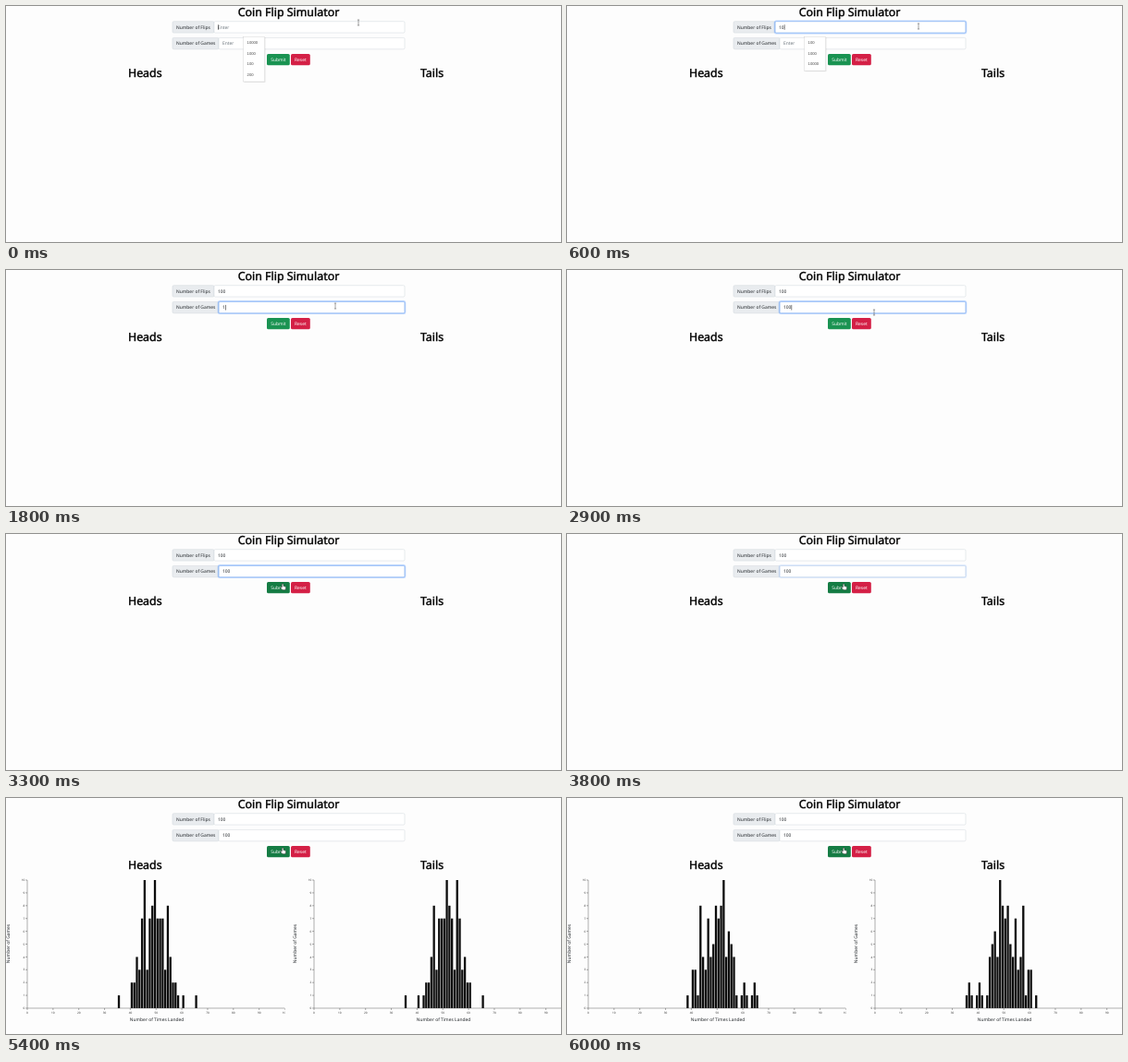
These frames come from a looping animation (600 px wide and 256 px high, 6.4 s). An HTML page:

```html
<!DOCTYPE html>
<html lang="en">
<head>
<meta charset="utf-8">
<title>Coin Flip Simulator</title>
<style>
  html, body { margin: 0; width: 100%; height: 100%; overflow: hidden; background: #fdfdfd; }
  svg { display: block; }
  text { font: 4.93px "Noto Sans", "Open Sans", sans-serif; fill: #212529; text-rendering: geometricPrecision; }
  .heading { font-size: 12.4px; fill: #000; stroke: #000; stroke-width: .4px; text-anchor: middle; }
  .mid { text-anchor: middle; }
  .white { fill: #fff; }
  .field { fill: #fff; stroke: #ced4da; stroke-width: .5px; }
  .label { fill: #e9ecef; stroke: #ced4da; stroke-width: .5px; }
  .tick { font-size: 3.1px; fill: #333; }
  .menu text { font: 4.15px "Liberation Sans", Arial, sans-serif; fill: #444; }
  .axis { fill: none; stroke: #333; stroke-width: .4px; }
  .bar { fill: #0c0c0c; }
</style>
</head>
<body>
<svg id="stage" width="600" height="256" viewBox="0 0 600 256"></svg>
<script>
const LOOP = 6400, STEP = 100, BLINK = 530;
const HOVER = 3300, FIRST_RUN = 3900, SECOND_RUN = 5500;
const FIRST_VALUE = 35; // fewest heads in any plotted game

// Games per number of heads, starting at FIRST_VALUE
const runs = [
  [1,0,0,0,0, 2,2,4,3,7, 10,3,7,8,10, 7,7,7,3,8, 4,2,2,1,0, 1,0,0,0,0, 1],
  [0,0,0,1,0, 3,3,1,8,4, 3,7,4,5,8, 7,8,10,4,6, 5,4,1,0,1, 2,1,0,1,2, 1],
];

// Each field: typed text by time, and when it has focus
const fields = [
  { label: 'Number of Flips', y: 16.7, x: 225, on: 50, off: 1500, keys: [400, 500, 700] },
  { label: 'Number of Games', y: 34.4, x: 230, on: 1500, off: 3710, keys: [1800, 2200, 2600] },
];

const mousePath = [
  [0, 381, 18], [200, 380, 22], [1100, 380, 22], [1500, 356, 39], [2300, 356, 39],
  [2400, 339, 42], [2900, 332, 46], [3200, 308, 55], [3300, 299, 54], [LOOP, 299, 54],
];

const text = (x, y, str, cls = '', extra = '') =>
  `<text x="${x}" y="${y}" class="${cls}" ${extra}>${str}</text>`;
const rect = (x, y, w, h, cls = '', extra = '') =>
  `<rect x="${x}" y="${y}" width="${w}" height="${h}" class="${cls}" ${extra}/>`;
const range = n => [...Array(n).keys()];
const ramp = (t, start) => Math.min(1, Math.max(0, (t - start) / 150));

const unitX = 2.785, unitY = 13.9, left = 23, bottom = 228;

function fieldMarkup({ label, x, y }, i) {
  return rect(180, y, x - 180, 12.4, 'label', 'rx="1.3"') + text(184, y + 8, label) +
    rect(x, y, 431 - x, 12.4, 'field', 'rx="1.3"') +
    `<g id="ring${i}">` +
    rect(x - .6, y - .6, 432.2 - x, 13.6, '', 'rx="1.9" fill="none" stroke="#0d6efd" stroke-opacity=".25" stroke-width="1.4"') +
    rect(x, y, 431 - x, 12.4, '', 'rx="1.3" fill="none" stroke="#86b7fe" stroke-width=".6"') + '</g>' +
    text(x + 4, y + 8, '', '', `id="value${i}"`) +
    rect(0, y + 3.5, .5, 5.6, '', `id="caret${i}"`);
}

function chartMarkup(offset, i) {
  const right = left + 100 * unitX, top = bottom - 10 * unitY;
  let ticks = '', labels = '';
  for (const n of range(11)) {
    const x = left + n * 10 * unitX, y = bottom - n * unitY;
    ticks += `M${x} ${bottom}v2M${left} ${y}h-2`;
    labels += text(x, bottom + 5.6, n * 10, 'tick mid') +
      text(left - 2.6, y + 1.1, n, 'tick', 'text-anchor="end"');
  }
  return `<svg x="${offset}" width="301.6" height="256"><g id="bars${i}"></g>` +
    `<path class="axis" d="M${left} ${top}V${bottom}H${right}${ticks}"/>${labels}` +
    text(163, 242.2, 'Number of Times Landed', 'mid') +
    text(0, 0, 'Number of Games', 'mid', 'transform="translate(4 158) rotate(-90)"') + '</svg>';
}

function barsMarkup(counts) {
  return counts.map((n, i) => n && rect(left + (FIRST_VALUE + i) * unitX + .4,
    bottom - n * unitY, 2.3, n * unitY, 'bar')).filter(Boolean).join('');
}

function menuMarkup(items) {
  return rect(257.4, 34, 23, items.length * 11.7 + 2, '', 'fill="#000" opacity=".12"') +
    rect(256.8, 33.2, 23, items.length * 11.7 + 2, '', 'fill="#fff" stroke="#ccc" stroke-width=".4"') +
    items.map((item, i) => text(260.6, 41 + i * 11.7, item)).join('');
}

const $ = id => document.getElementById(id);
$('stage').innerHTML =
  text(305.5, 11.2, 'Coin Flip Simulator', 'heading') +
  text(150.3, 77, 'Heads', 'heading') + text(460.5, 77, 'Tails', 'heading') +
  fields.map(fieldMarkup).join('') +
  rect(282, 52, 24.8, 12.3, '', 'rx="1.6" id="submit"') + text(294.4, 60, 'Submit', 'mid white') +
  rect(308, 52, 20.8, 12.3, '', 'rx="1.6" fill="#d42046"') + text(318.4, 60, 'Reset', 'mid white') +
  `<g id="charts">${[0, 310].map(chartMarkup).join('')}</g>` +
  '<g id="menu" class="menu"></g>' +
  `<g id="mouse">
    <path id="beam" d="M-1.1-3h2.2M0-3v6M-1.1 3h2.2" stroke="#555" stroke-width=".55"/>
    <path id="arrow" d="M0 0v4.6l1-.9.8 1.7.7-.3-.8-1.7h1.5z" fill="#fff" stroke="#000" stroke-width=".4"/>
    <path id="hand" d="M0 0c.7 0 .9.4.9 1v1.6l2 .5c.6.2.8.6.7 1.2l-.5 2.4h-3.3l-1.8-2.7c-.2-.5.4-.9.9-.4l.4.4V1c0-.6.3-1 .7-1z" fill="#fff" stroke="#000" stroke-width=".4"/>
  </g>`;

const show = (id, visible) => { $(id).style.display = visible ? '' : 'none'; };
const cache = {};
function setMarkup(id, key, build) {
  if (cache[id] === key) return;
  cache[id] = key;
  $(id).innerHTML = build();
}

function drawField(field, i, t) {
  const { x, on, off, keys } = field;
  const pressed = keys.filter(k => k <= t);
  const value = $('value' + i);
  value.textContent = '100'.slice(0, pressed.length) || 'Enter';
  value.style.fill = pressed.length ? '' : '#6c757d';
  $('ring' + i).style.opacity = ramp(t, on) - ramp(t, off);

  const focused = t >= on - 50 && t < off + 50;
  const since = t - (pressed.at(-1) ?? on - 50);
  show('caret' + i, focused && since % (2 * BLINK) < BLINK);
  $('caret' + i).setAttribute('x', x + 4.2 + (pressed.length ? value.getComputedTextLength() : 0));
}

function drawMouse(t) {
  const i = mousePath.findIndex(p => p[0] > t);
  const [t0, x0, y0] = mousePath[i - 1], [t1, x1, y1] = mousePath[i];
  const k = (t - t0) / (t1 - t0), x = x0 + (x1 - x0) * k, y = y0 + (y1 - y0) * k;
  $('mouse').setAttribute('transform', `translate(${x} ${y})`);
  show('hand', t >= HOVER);
  show('arrow', t < HOVER && y > 47);
  show('beam', t < HOVER && y <= 47);
}

function draw(t) {
  fields.forEach((field, i) => drawField(field, i, t));
  drawMouse(t);
  $('submit').style.fill = t >= HOVER ? '#157c44' : '#1a9352';

  const typing = t >= fields[0].keys[0];
  show('menu', t < fields[0].off);
  setMarkup('menu', typing, () => menuMarkup(typing ? [100, 1000, 10000] : [10000, 1000, 100, 200]));

  show('charts', t >= FIRST_RUN);
  const run = t >= SECOND_RUN ? 1 : 0;
  setMarkup('bars0', run, () => barsMarkup(runs[run]));
  setMarkup('bars1', run, () => barsMarkup([...runs[run]].reverse()));
}

const start = performance.now();
function tick() {
  const t = (performance.now() - start) % LOOP;
  draw(Math.floor(t / STEP) * STEP);
  requestAnimationFrame(tick);
}
tick();
</script>
</body>
</html>
```
